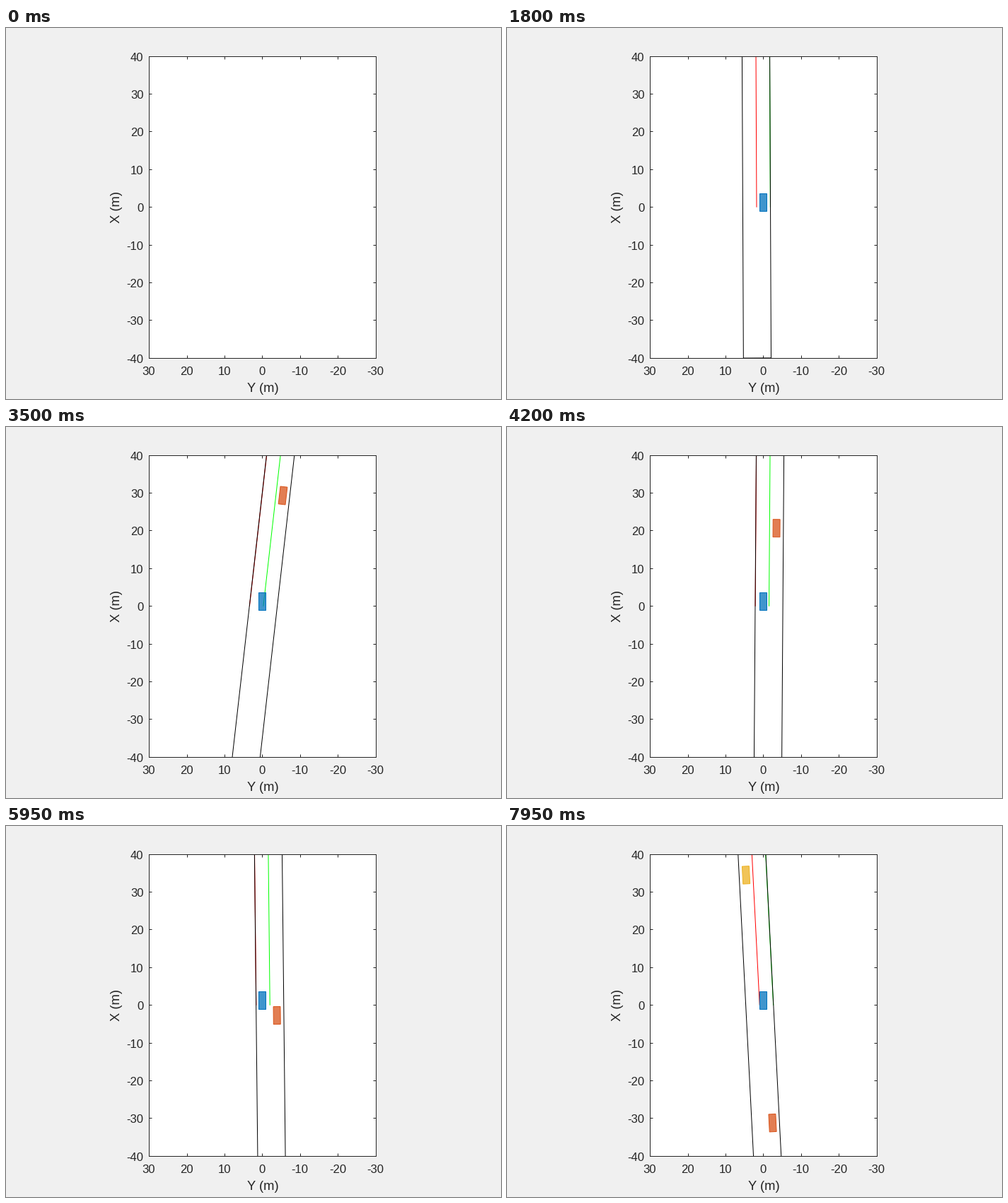
A matplotlib script that plays this animation: 700x525 px, repeating every 8 s.

```python
import numpy as np
import matplotlib.pyplot as plt
from matplotlib.animation import FuncAnimation
from matplotlib.colors import to_rgba

W, H, DPI = 700, 525, 100
FRAMES, STEP = 160, 50
PX = 72 / DPI                      # one pixel in points
LEFT, RIGHT, TOP, BOTTOM = 202.2, 522.6, 39.7, 466.7
INK = "#262626"
BLUE, ORANGE, YELLOW = "#0072bd", "#d95319", "#edb120"

ROAD_WIDTH = 7.33
LANE = ROAD_WIDTH / 2
SPEED = 1.145                      # metres per frame
CAR_LENGTH, CAR_WIDTH, REAR = 4.68, 1.85, 1.0
START_EDGE, TILT = 5.43, .0044

k = np.arange(FRAMES)


def turn(amount, mid, half):
    """Steering that swells around the middle frame and dies away again."""
    return amount * np.exp(-((k - mid) / half) ** 4)


# move left, settle, drift back, move right
drift = (turn(-.118, 67.2, 13.5) + turn(-.0248, 98, 10)
         + turn(.007, 126, 12) + turn(.178, 150.5, 7.9))
slope = drift + TILT
edge = START_EDGE + SPEED * (np.cumsum(drift) - drift / 2)

# distances to the rear of the other two cars
gap = np.polyval(np.polyfit([56, 84, 119, 143, 159],
                            [35.1, 18.35, -5.3, -21.9, -33.7], 3), k)
gap[:46] = 60
lead = 32.1 + .72 * (FRAMES - 1 - k)

fig = plt.figure(figsize=(W / DPI, H / DPI), dpi=DPI, facecolor="#f0f0f0")
plt.rcParams["font.family"] = "Liberation Sans"
ax = fig.add_axes([LEFT / W, 1 - BOTTOM / H, (RIGHT - LEFT) / W, (BOTTOM - TOP) / H])
ax.set(xlim=(30, -30), ylim=(-40, 40),
       xticks=range(-30, 31, 10), yticks=range(-40, 41, 10))
ax.tick_params(direction="in", length=4.3 * PX, width=PX, color=INK,
               top=True, right=True, labelbottom=False, labelleft=False)
for spine in ax.spines.values():
    spine.set(linewidth=PX, edgecolor=INK)


def text(x, y, s, size, ha="center", rotation=0):
    fig.text(x / W, 1 - y / H, s, size=size * PX, color=INK, ha=ha,
             va="baseline", rotation=rotation, rotation_mode="anchor")


for v in range(-30, 31, 10):
    text(LEFT + (30 - v) * (RIGHT - LEFT) / 60 - .2, 491, str(v), 16.67)
for v in range(-40, 41, 10):
    text(194.5, TOP + (40 - v) * (BOTTOM - TOP) / 80 + 7, str(v), 16.67, "right")
text(363, 515, "Y (m)", 18.33)
text(161, 253.5, "X (m)", 18.33, rotation=90)


def line(color, z):
    return ax.plot([], [], color=color, lw=PX, zorder=z)[0]


def car(color):
    return ax.fill([0, 0, 0], [0, 0, 0], facecolor=to_rgba(color, .75),
                   edgecolor=color, lw=PX, zorder=2.3)[0]


red, green, road = line("#ff0000", 2), line("#00ff00", 2), line("black", 2.1)
ego, slow, ahead = car(BLUE), car(ORANGE), car(YELLOW)
artists = [red, green, road, ego, slow, ahead]


def place(patch, rear, y, b):
    """Put a car with its rear centre at (rear, y), heading along slope b."""
    n = np.hypot(1, b)
    along = np.array([0, CAR_LENGTH, CAR_LENGTH, 0]) / n
    side = np.array([1, 1, -1, -1]) * CAR_WIDTH / 2 / n
    patch.set_xy(np.column_stack([y + along * b + side, rear + along - side * b]))


def update(i):
    for art in artists:
        art.set_visible(i > 0)
    if i == 0:
        return artists
    a, b = edge[i], slope[i]
    stretch = np.hypot(1, b)

    def lateral(offset, x):
        return a - offset * stretch + b * x

    # road outline, with its start square to the edges
    start = -SPEED * (i - 1)
    xs = np.array([200, start, start + ROAD_WIDTH * b / stretch, 200])
    offsets = np.array([0, 0, ROAD_WIDTH, ROAD_WIDTH])
    road.set_data(lateral(offsets, xs), xs)

    # borders of the lane the ego car is in, a hair inside the road
    near = LANE if a > LANE else 0
    x = np.array([0, 60])
    for border, offset in ((red, near), (green, near + LANE)):
        border.set_data(lateral(np.clip(offset, .03, ROAD_WIDTH - .03), x), x)

    place(ego, -REAR, 0, 0)
    place(slow, gap[i], lateral(1.5 * LANE, gap[i]), b)
    place(ahead, lead[i], lateral(.5 * LANE, lead[i]), b)
    return artists


anim = FuncAnimation(fig, update, frames=FRAMES, interval=STEP, repeat=True,
                     repeat_delay=0, init_func=lambda: update(0), blit=False)
plt.show()
```
